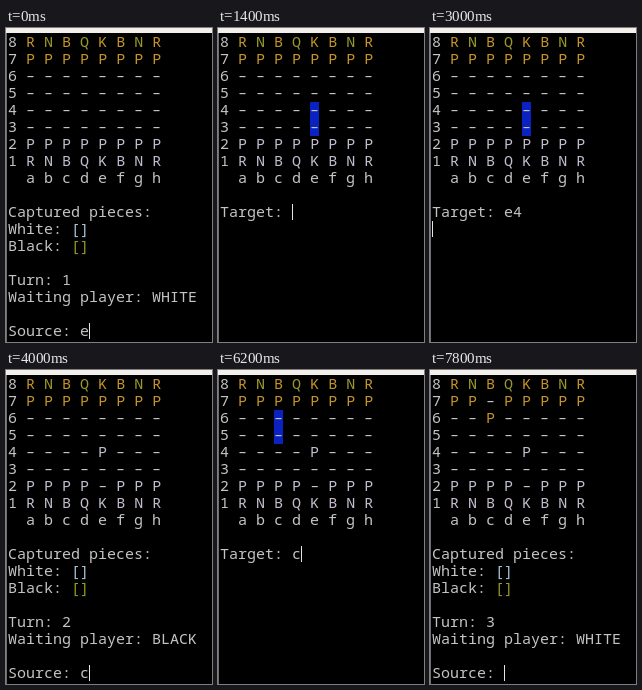
These frames come from a looping animation (206x314 px, 8000 ms). An HTML page:

```html
<!DOCTYPE html>
<html lang="en">
<head>
<meta charset="utf-8">
<title>Console chess</title>
<style>
  html, body { margin: 0; width: 100%; height: 100%; overflow: hidden; background: #000; }
  #bar { position: absolute; left: 0; top: 0; width: 100%; height: 5px; background: #f3efea; }
  #edge { position: absolute; left: 0; top: 5px; width: 1px; bottom: 0; background: #6e6e6e; }
  #screen {
    position: absolute; left: 2px; top: 5px; margin: 0;
    font: 15px/17px "Noto Sans Mono", "DejaVu Sans Mono", monospace;
    color: #c4c4c4; white-space: pre;
  }
  #caret { position: absolute; width: 1px; height: 16px; background: #e4e4e4; }
  .black { color: #c4942a; }
  .olive { color: #98982a; }
  .white { color: #c4bccc; }
  .sky { color: #a8c4d8; }
  .hint {
    display: inline-block; position: relative; top: 1px; height: 17px;
    line-height: 15px; vertical-align: top; background: #0a22c2;
  }
</style>
</head>
<body>
<div id="bar"></div>
<div id="edge"></div>
<pre id="screen"></pre>
<div id="caret"></div>
<script>
const LOOP = 8000, CELL = 9, LINE = 17, BLINK = 530;
const screenEl = document.getElementById('screen');
const caretEl = document.getElementById('caret');

// Lower case is the black side.
const start = ['rnbqkbnr', 'pppppppp', '--------', '--------',
               '--------', '--------', 'PPPPPPPP', 'RNBQKBNR'];

function move(board, from, to) {
  const rows = board.map(row => [...row]);
  const at = square => [8 - square[1], square.charCodeAt(0) - 97];
  const [r0, c0] = at(from), [r1, c1] = at(to);
  rows[r1][c1] = rows[r0][c0];
  rows[r0][c0] = '-';
  return rows.map(row => row.join(''));
}

const second = move(start, 'e2', 'e4');
const third = move(second, 'c7', 'c6');

const turn = (board, number, player) => ({ board, number, player, hints: [] });
const target = (board, ...hints) => ({ board, hints });

const white1 = turn(start, 1, 'WHITE');
const pick1 = target(start, 'e4', 'e3');
const black2 = turn(second, 2, 'BLACK');
const pick2 = target(second, 'c6', 'c5');
const white3 = turn(third, 3, 'WHITE');

// time, view, typed text ("\n" after Enter)
const steps = [
  [0, white1, 'e'],
  [400, white1, 'e2'],
  [800, white1, 'e2\n'],
  [1000, pick1, ''],
  [2000, pick1, 'e'],
  [2200, pick1, 'e4'],
  [2800, pick1, 'e4\n'],
  [3200, black2, ''],
  [3800, black2, 'c'],
  [4200, black2, 'c7'],
  [5400, pick2, ''],
  [6000, pick2, 'c'],
  [6400, pick2, 'c6'],
  [6600, pick2, 'c6\n'],
  [6700, white3, '']
];

const span = (name, text) => `<span class="${name}">${text}</span>`;

function piece(char, square, hints) {
  const empty = '–';
  if (hints.includes(square)) return span('hint', empty);
  if (char === '-') return empty;
  if (/[A-Z]/.test(char)) return span('white', char);
  return span(/[nq]/.test(char) ? 'olive' : 'black', char.toUpperCase());
}

function lines({ board, hints, number, player }, typed) {
  const rows = board.map((row, r) => `${8 - r} ` +
    [...row].map((char, c) => piece(char, 'abcdefgh'[c] + (8 - r), hints)).join(' '));
  rows.push('  a b c d e f g h', '');
  if (!number) return [...rows, 'Target: ' + typed];
  return [...rows, 'Captured pieces:', 'White: ' + span('sky', '[]'),
    'Black: ' + span('olive', '[]'), '',
    'Turn: ' + number, 'Waiting player: ' + player, '', 'Source: ' + typed];
}

let shown = null;

function draw(time) {
  const step = steps.findLast(s => s[0] <= time);
  const [since, view, typed] = step;
  if (step !== shown) {
    shown = step;
    const entered = typed.endsWith('\n');
    const text = typed.trim();
    const rows = lines(view, text);
    screenEl.innerHTML = rows.join('\n');
    const row = rows.length - (entered ? 0 : 1);
    const column = entered ? 0 : 'Source: '.length + text.length;
    caretEl.style.left = 2 + column * CELL + 'px';
    caretEl.style.top = 6 + row * LINE + 'px';
  }
  const on = Math.floor((time - since) / BLINK) % 2 === 0;
  caretEl.style.visibility = on ? 'visible' : 'hidden';
}

const origin = performance.now();
function tick() {
  draw((performance.now() - origin) % LOOP);
  requestAnimationFrame(tick);
}
tick();
</script>
</body>
</html>
```
